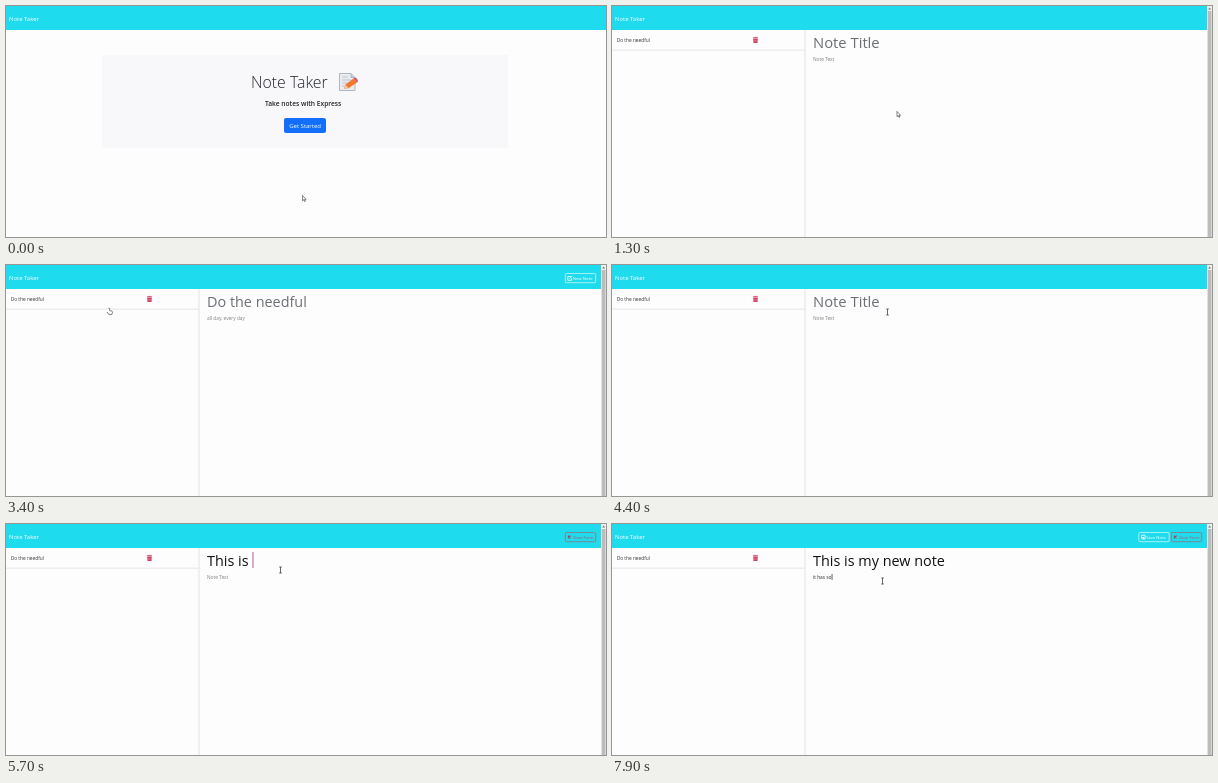
Animation, 600 px wide and 231 px high, one loop 8 s. Source, as an HTML page with a canvas:

```html
<!DOCTYPE html>
<html lang="en">
<head>
<meta charset="utf-8">
<title>Note Taker</title>
<style>
  html, body { margin: 0; width: 100%; height: 100%; overflow: hidden; background: #fefdfe; }
  canvas { display: block; }
</style>
</head>
<body>
<canvas id="stage" width="600" height="231"></canvas>
<script>
const ctx = document.getElementById('stage').getContext('2d');
const LOOP = 8000, STEP = 100;
const CYAN = '#1edbed', GRAY = '#6b6f74', INK = '#212529', RED = '#d2365a';
const TITLE = 'This is my new note', BODY = 'it has so';

// Pointer path: time, x, y, shape (shape holds until the next key)
const pointerKeys = [
  [0, 296.5, 189.5, 'arrow'], [100, 297, 168, 'arrow'], [200, 297, 122, 'hand'],
  [300, 298, 83, 'arrow'], [400, 296, 108, 'arrow'], [500, 295, 117, 'hand'],
  [1100, 295, 117, 'arrow'], [1600, 270, 88, 'arrow'], [1700, 270, 88, 'arrow'],
  [1800, 118, 39, 'hand'], [2000, 118, 39, 'hand'], [2100, 81, 37, 'hand'],
  [3300, 81, 38, 'hand'], [3400, 103, 43, 'hand'], [3500, 103, 43, 'hand'],
  [3600, 190, 38, 'arrow'], [3900, 573, 12, 'hand'], [4100, 573, 12, 'hand'],
  [4200, 500, 18, 'arrow'], [4300, 500, 18, 'arrow'], [4400, 275.5, 47, 'beam'],
  [4700, 274.5, 46, 'beam'], [6600, 274.5, 46, 'beam'], [6900, 270.5, 57, 'beam'],
  [8000, 270.5, 57, 'beam']
];

function pointerAt(t) {
  const i = pointerKeys.findIndex(k => k[0] > t);
  const [t0, x0, y0, shape] = pointerKeys[i - 1], [t1, x1, y1] = pointerKeys[i];
  const p = (t - t0) / (t1 - t0);
  return { x: x0 + (x1 - x0) * p, y: y0 + (y1 - y0) * p, shape };
}

function rect(x, y, w, h, color) {
  ctx.fillStyle = color;
  ctx.fillRect(x, y, w, h);
}

function roundBox(x, y, w, h, r, fill, stroke, lineWidth = 0.5) {
  ctx.beginPath();
  ctx.roundRect(x, y, w, h, r);
  if (fill) { ctx.fillStyle = fill; ctx.fill(); }
  if (stroke) { ctx.strokeStyle = stroke; ctx.lineWidth = lineWidth; ctx.stroke(); }
}

function text(str, x, y, size, color, weight = 400) {
  ctx.font = `${weight} ${size}px "Open Sans", sans-serif`;
  ctx.fillStyle = color;
  ctx.fillText(str, x, y);
  return x + ctx.measureText(str).width;
}

function shape(d, x, y, fill, stroke, lineWidth = 0.6) {
  const path = new Path2D(d);
  ctx.save();
  ctx.translate(x, y);
  if (fill) { ctx.fillStyle = fill; ctx.fill(path); }
  if (stroke) { ctx.strokeStyle = stroke; ctx.lineWidth = lineWidth; ctx.stroke(path); }
  ctx.restore();
}

function drawPointer({ x, y, shape: kind }) {
  if (kind === 'arrow') shape('M0 0V5.2L1.2 4.2 2 6 2.9 5.6 2.1 3.9H3.6Z', x, y, '#fff', '#333');
  else if (kind === 'hand') shape('M-.6 .4Q0-.5 .6 .4V2.6L3 3.2Q3.7 3.5 3.5 4.5L2.9 6.4H-.2L-2 4Q-2-3.2 -.6 4Z'.replace('-3.2', '3.2'), x, y, '#fff', '#333');
  else shape('M-1.3-3H1.3M0-3V3M-1.3 3H1.3', x, y, null, '#444', 0.8);
}

function drawMemo(x, y) {
  shape('M.5 .5H12L16 4.5V17.5H.5Z', x, y, '#e9ecf1', '#a3a8b2', 0.8);
  shape('M12 .5V4.5H16', x, y, '#c9ced8', '#a3a8b2', 0.7);
  shape('M3 4H9M3 7H12M3 10H9M3 13H7', x, y, null, '#b4bac5', 0.8);
  shape('M5 15.5L6.5 11.5 14.5 5.5 18 9.5 9.5 15.3Z', x, y, '#f4772e');
  shape('M14.5 5.5L16 4.5Q18.5 5 19 8.5L18 9.5Z', x, y, '#e0526a');
  shape('M5 15.5L6.5 11.5 9.5 15.3Z', x, y, '#f3c79c');
}

function navbar(width) {
  rect(0, 0, width, 24, CYAN);
  text('Note Taker', 3, 14.5, 5.95, '#fff');
}

function drawHome(t) {
  const hover = t === 200 || t >= 500, pressed = t >= 800;
  navbar(600);
  rect(96, 49, 406, 93, '#f8f7fa');
  text('Note Taker', 245, 81.8, 15.9, INK, 300);
  drawMemo(333, 67);
  text('Take notes with Express', 259, 100.4, 6.65, INK, 600);
  if (pressed) roundBox(277.4, 111.4, 43.2, 16.2, 2.4, '#9ec5fe');
  roundBox(278, 112, 42, 15, 2, pressed ? '#0a58ca' : hover ? '#0f5bd3' : '#136ffa');
  text('Get Started', 283.2, 122.1, 6, '#fff');
}

function navButton(x, label, size, color, fill) {
  roundBox(x + 0.3, 8.5, 30.4, 9.2, 1.3, fill, color, 0.6);
  text(label, x + 7.7, 14.8, size, color);
}

function newNoteButton(hover) {
  const color = hover ? INK : '#fff';
  navButton(559, 'New Note', 4.35, color, hover && '#f8f9fa');
  shape('M3.5 1H.5V4.8H4.3V3M2 3.3L5 .3', 561.3, 10.5, null, color, 0.8);
}

function saveButton() {
  navButton(526.5, 'Save Note', 4.2, '#fff');
  roundBox(529.6, 11.2, 3.6, 3.8, 0.4, null, '#fff', 0.8);
  rect(530.5, 13, 1.8, 1.6, '#fff');
}

function clearButton() {
  navButton(559, 'Clear Form', 4.05, '#b8525f');
  shape('M0 0L2.6 2.6M2.6 0L0 2.6', 562, 11.7, null, '#b8323f', 1.1);
}

function drawTrash() {
  rect(141, 31.4, 5, 1, RED);
  rect(142.5, 30.9, 2, 0.6, RED);
  roundBox(141.4, 32.7, 4.2, 4.4, 0.6, RED);
  for (const x of [142.3, 143.4, 144.5]) rect(x, 33.6, 0.3, 2.6, '#eeb4c2');
}

function drawScrollbar() {
  rect(595, 0, 5, 231, '#f1f1f1');
  rect(595.7, 5, 3.8, 226, '#bcbcbc');
  shape('M0 2L1.5 0 3 2Z', 596.1, 1.5, '#777');
}

const typed = (str, t, start, pace) =>
  t < start ? '' : str.slice(0, 1 + Math.floor((t - start) / pace));

function drawNotes(t) {
  const viewing = t >= 2300 && t < 4100;
  const title = typed(TITLE, t, 5200, 70), body = typed(BODY, t, 7400, 62);

  navbar(595);
  drawScrollbar();
  rect(192.5, 24, 1, 207, '#e2e4e4');
  if (t >= 1200) {
    text('Do the needful', 4.7, 36.2, 4.8, '#33373b');
    drawTrash();
    rect(0, 43.7, 193, 0.8, '#dedfe1');
  }

  let titleEnd = 201.5, bodyEnd = 201.2;
  if (viewing) {
    text('Do the needful', 201, 42.3, 14.4, GRAY);
    text('all day, every day', 201, 54.7, 4.8, '#7d8186');
    newNoteButton(t >= 3900);
  } else {
    if (title) titleEnd = text(title, 201, 42.3, 14.4, '#111');
    else text('Note Title', 201, 42.3, 14.8, GRAY);
    if (body) bodyEnd = text(body, 201, 54.7, 4.8, INK);
    else text('Note Text', 201, 54.7, 4.8, '#7d8186');
  }
  if (title) clearButton();
  if (body) saveButton();

  if (t >= 4700 && t < 7000) rect(titleEnd + 0.3, 28, 0.8, 16, '#a0307a');
  if (t >= 7000) rect(bodyEnd + 0.2, 50, 0.7, 5.8, '#222');
}

function draw(t) {
  rect(0, 0, 600, 231, '#fefdfe');
  (t < 1100 ? drawHome : drawNotes)(t);
  drawPointer(pointerAt(t));
}

function tick() {
  const t = performance.now() % LOOP;
  draw(Math.floor(t / STEP) * STEP);
  requestAnimationFrame(tick);
}
tick();
</script>
</body>
</html>
```
